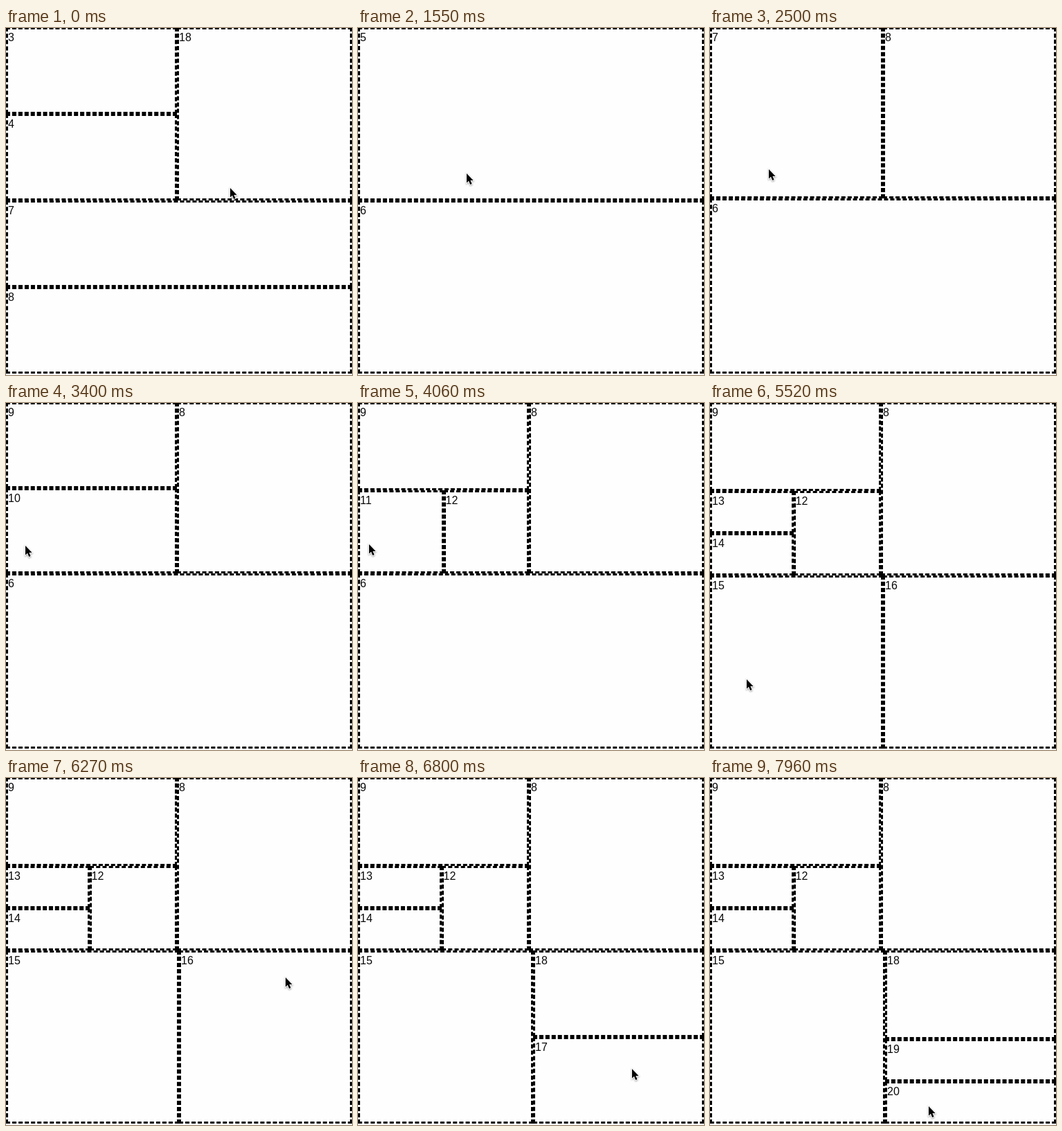
An HTML page that plays this animation: 500 by 501 pixels, repeating every 8000 ms.

```html
<!DOCTYPE html>
<html lang="en">
<head>
<meta charset="utf-8">
<title>Splitting panes</title>
<style>
  * { box-sizing: border-box; }
  html, body { margin: 0; width: 100%; height: 100%; overflow: hidden; background: #fefefe; }
  body { font: 16px/1.5 "Liberation Sans", Arial, sans-serif; color: #0a0a0a; cursor: none; }
  #stage { position: absolute; left: 0; top: -1px; display: flex; width: 500px; height: 500px; }
  #stage div { flex: 1 1 0px; min-width: 0; min-height: 0; }
  .row, .column, .column-reverse { display: flex; }
  .column { flex-direction: column; }
  .column-reverse { flex-direction: column-reverse; }
  .pane { border: 3px dashed #000; }
  #pointer {
    position: absolute; left: 0; top: 0; overflow: visible;
    filter: drop-shadow(0 1px 1px rgba(0, 0, 0, .4));
  }
</style>
</head>
<body>
<div id="stage"></div>
<svg id="pointer" width="12" height="18">
  <path d="M0 0V13.6L3 10.8L5.2 16.1L7.6 15.1L5.4 9.9H9.6Z" stroke="#fff" stroke-width="1.6" paint-order="stroke"/>
</svg>
<script>
const LOOP = 8000;
const STEP = 60;
const stage = document.getElementById('stage');
const pointer = document.getElementById('pointer');

const pane = id => `<div class="pane">${id}</div>`;
const group = (dir, ...kids) => `<div class="${dir}">${kids.map(kid =>
  typeof kid === 'number' ? pane(kid) : kid).join('')}</div>`;

const layouts = [
  { at: 0, html: group('column', group('row', group('column', 3, 4), 18), group('column', 7, 8)) },
  { at: 870, html: group('column', 5, 6) }
];

// Each split replaces one pane with two newly numbered ones
let nextId = 7;
function split(at, id, dir) {
  const { html } = layouts.at(-1);
  layouts.push({ at, html: html.replace(pane(id), group(dir, nextId++, nextId++)) });
}
split(2150, 5, 'row');
split(2920, 7, 'column');
split(3880, 10, 'row');
split(4630, 11, 'column');
split(5520, 6, 'row');
split(6560, 16, 'column-reverse');
split(7490, 17, 'column');

// Each glide leads from wherever the pointer rests to a new place
const glides = [];
let rest = [324, 231];
function glide(start, end, ...to) {
  glides.push({ start, end, from: rest, to });
  rest = to;
}
glide(570, 630, 343, 217);
glide(1350, 1610, 118, 208);
glide(1790, 1970, 62, 189);
glide(2440, 2680, 110, 221);
glide(3160, 3400, 28, 206);
glide(3520, 3700, 9, 202);
glide(4060, 4570, 62, 219);
glide(4870, 5070, 93, 320);
glide(5130, 5340, 53, 399);
glide(5630, 6040, 400, 295);
glide(6270, 6500, 417, 268);
glide(6740, 6800, 396, 420);
glide(6850, 7310, 371, 486);
glide(7730, 7960, 309, 473);

const easeOut = u => 1 - (1 - u) ** 1.27;

function pointerAt(t) {
  const g = glides.findLast(g => g.start <= t);
  if (!g) return glides[0].from;
  const elapsed = (Math.floor((t - g.start) / STEP) + 1) * STEP;
  const u = easeOut(Math.min(1, elapsed / (g.end - g.start + STEP)));
  return g.from.map((v, axis) => Math.round(v + (g.to[axis] - v) * u));
}

let shown;
function draw(t) {
  const layout = layouts.findLast(l => l.at <= t);
  if (layout !== shown) {
    stage.innerHTML = layout.html;
    shown = layout;
  }
  const [x, y] = pointerAt(t);
  pointer.style.transform = `translate(${x}px, ${y}px)`;
}

const began = performance.now();
function tick() {
  draw((performance.now() - began) % LOOP);
  requestAnimationFrame(tick);
}
tick();
</script>
</body>
</html>
```
